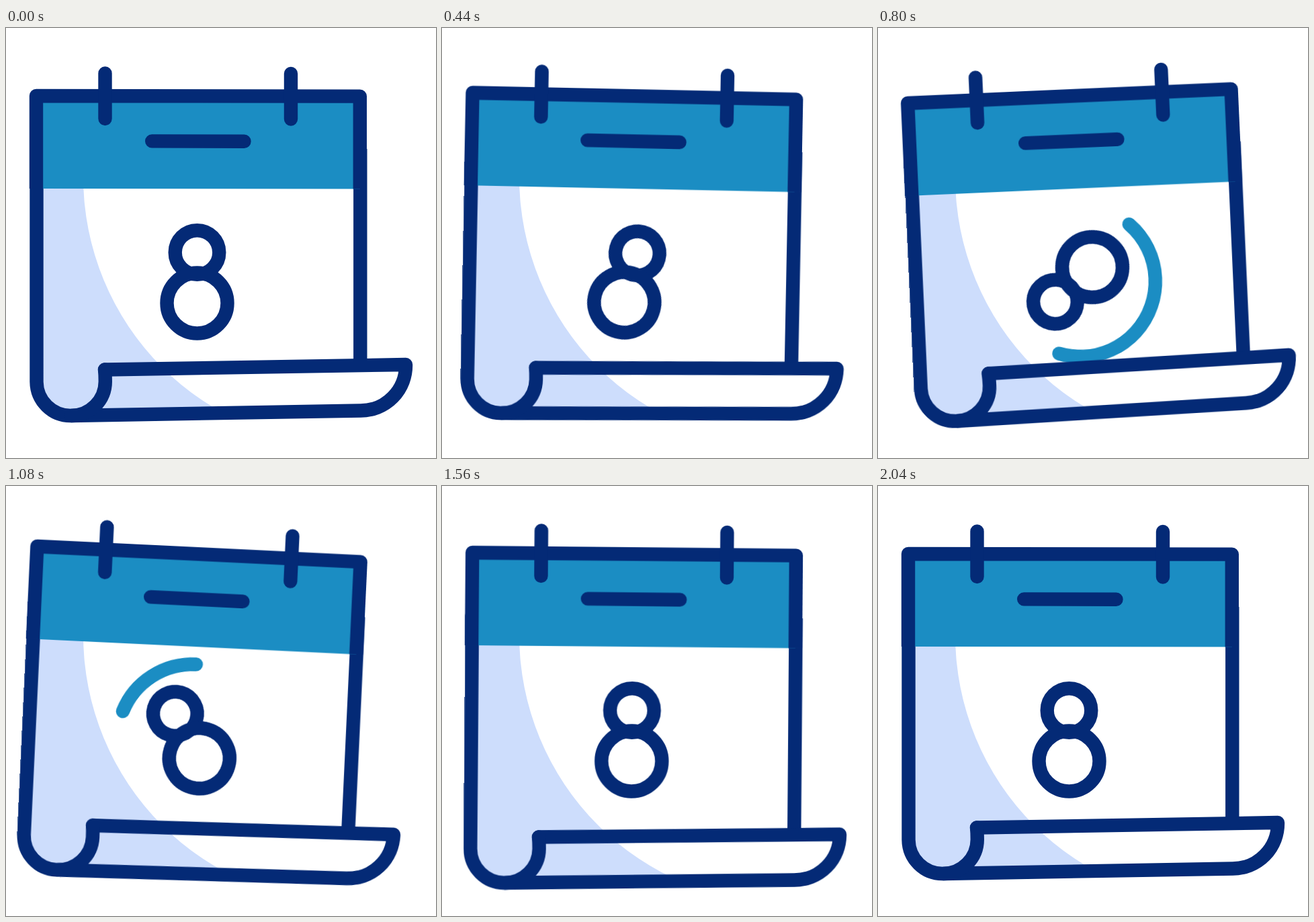
Animation, 640 px wide and 640 px high, one loop 2400 ms. Source, as an HTML page:

```html
<!DOCTYPE html>
<html lang="en">
<head>
<meta charset="utf-8">
<title>Calendar page</title>
<style>
  @property --tail { syntax: '<length>'; inherits: false; initial-value: 0px; }
  @property --tip { syntax: '<length>'; inherits: false; initial-value: 0px; }

  :root {
    --navy: #042a76;
    --blue: #1b8dc3;
    --pale: #cdddfc;
    --ease: cubic-bezier(.333, 0, .667, 1);
  }
  html, body { margin: 0; width: 100%; height: 100%; overflow: hidden; background: #fff; }
  svg { display: block; width: 100%; height: 100%; }

  .line {
    fill: none;
    stroke: var(--navy);
    stroke-width: 20.4;
    stroke-linecap: round;
    stroke-linejoin: round;
  }
  .flat { stroke-linecap: butt; }

  .swing { transform-origin: 286px 125px; animation: swing 2400ms var(--ease) infinite; }
  .page { animation: stretch 2400ms var(--ease) infinite; }
  .digit { transform-origin: 284.5px 377.8px; animation: spin 2400ms infinite; }
  .trail {
    stroke: var(--blue);
    stroke-dasharray: calc(var(--tip) - var(--tail)) 720px;
    stroke-dashoffset: calc(var(--tail) * -1);
    animation: tip 2400ms var(--ease) infinite, tail 2400ms var(--ease) infinite,
      show 2400ms step-end infinite;
  }

  @keyframes swing {
    0% { transform: rotate(0deg); }
    11.6667% { transform: rotate(-5deg); }
    23.3333% { transform: rotate(5deg); }
    35% { transform: rotate(-3deg); }
    46.6667% { transform: rotate(3deg); }
    58.3333% { transform: rotate(-2deg); }
    70% { transform: rotate(2deg); }
    81.6667%, 100% { transform: rotate(0deg); }
  }
  @keyframes stretch {
    0%, 40% { transform: translateY(0); }
    60% { transform: translateY(23px); }
    75% { transform: translateY(-7px); }
    85%, 100% { transform: translateY(0); }
  }
  @keyframes spin {
    0% { transform: rotate(0deg); }
    15% { transform: rotate(0deg); animation-timing-function: cubic-bezier(.23, 0, .345, 1); }
    58.3333%, 100% { transform: rotate(360deg); }
  }
  /* The trail is drawn from its tip and erased from its tail, in degrees of the circle. */
  @keyframes tip {
    0%, 20% { --tip: 0px; }
    45%, 100% { --tip: 360px; }
  }
  @keyframes tail {
    0%, 28.3333% { --tail: 0px; }
    51.6667%, 100% { --tail: 360px; }
  }
  @keyframes show {
    0% { opacity: 0; }
    20.5% { opacity: 1; }
    51.6%, 100% { opacity: 0; }
  }
</style>
</head>
<body>
<svg viewBox="0 0 640 640">
  <g class="swing">
    <path class="page" fill="var(--pale)"
      d="M45.5 180V526.5A51 51 0 0 0 97 577L528 569.5A67 67 0 0 0 595 501L527.3 502V180Z"/>
  </g>

  <!-- The light stays still while the page moves under it. -->
  <circle cx="515" cy="222" r="400" fill="#fff"/>

  <g class="swing">
    <path class="line trail" pathLength="360"
      d="M289.5 265.5A112 112 0 0 1 289.5 489.5A112 112 0 0 1 289.5 265.5"/>
    <g class="line digit">
      <circle cx="284.5" cy="334" r="32.8"/>
      <circle cx="284.5" cy="409.5" r="45"/>
    </g>
    <g class="line page">
      <path class="flat" d="M527.3 180V502"/>
      <path d="M45.5 180V526.5A51 51 0 0 0 97 577L528 569.5A67 67 0 0 0 595 501L147 508.5"/>
      <path d="M147 508.5Q147.8 516 147.8 526A51 51 0 0 1 97 577"/>
    </g>
    <path class="line flat" style="fill: var(--blue)" d="M45 239V101L526.8 101.6V239.5"/>
    <path class="line" d="M147.5 67.5V135M424 68V135.5M217.2 168.4L354.5 168.8"/>
  </g>
</svg>
</body>
</html>
```
